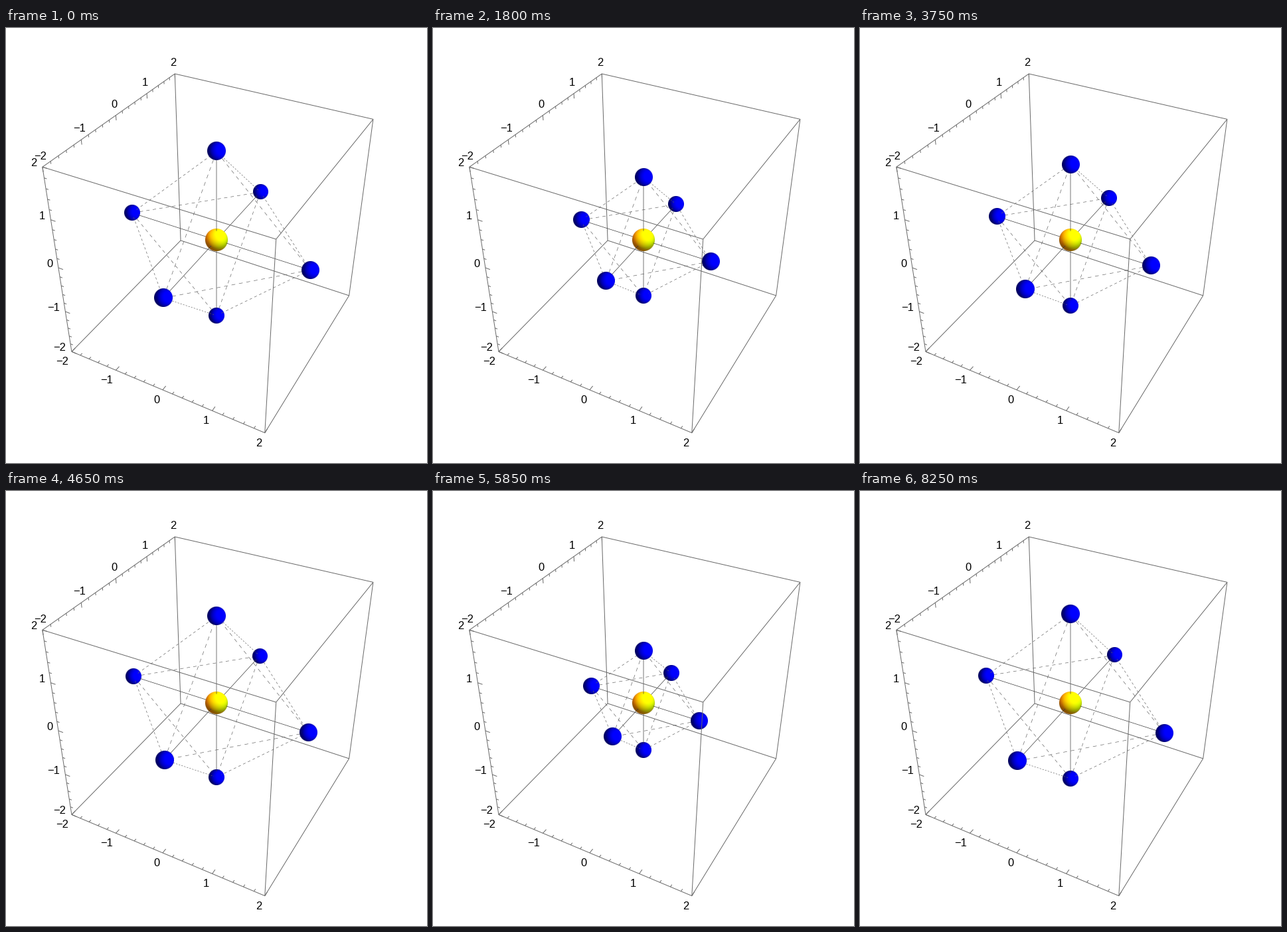
These frames come from a looping animation (634 px wide and 655 px high, 9000 ms). A matplotlib script:

```python
import itertools

import matplotlib.pyplot as plt
import numpy as np
from matplotlib.animation import FuncAnimation

W, H, DPI = 634, 655, 80
PX = 72 / DPI  # points per pixel

# Camera on the box centre; the box spans -2..2 on each axis.
EYE = 4 * np.array([1.3, -2.4, 2.0])
CENTRE = np.array([317.0, 319.2])
UNIT = 83.6  # pixels per unit at the box centre
DIST = np.linalg.norm(EYE)
AHEAD = EYE / DIST
RIGHT = np.cross((0, 0, 1), AHEAD)
RIGHT /= np.linalg.norm(RIGHT)
UP = np.cross(AHEAD, RIGHT)

BALL_R, CORE_R = 0.15, 0.2
DASH = 0.065
BOND_WIDTH, EDGE_WIDTH, BOX_WIDTH = 0.7, 0.65, 1.0
GREY = "#6a6a6a"

REST, PEAK, SWING = 1.82, 1.815, 0.404
HOLD, PERIOD, FRAMES = 5, 24.5, 60


def depth_scale(p):
    return 1 - AHEAD @ p / DIST


def project(p):
    return CENTRE + UNIT * np.array([RIGHT @ p, -UP @ p]) / depth_scale(p)


def layer(p):
    """Draw order: nearer points come later."""
    return 10 + AHEAD @ p


def sphere_image(base, n=96):
    """Shaded sphere under coloured lights."""
    t = (np.arange(n) + 0.5) / n * 2 - 1
    x, y = np.meshgrid(t, -t)
    rad = np.hypot(x, y)
    k = np.minimum(1, 0.99 / rad)
    nx, ny = x * k, y * k
    normal = np.stack([nx, ny, np.sqrt(1 - nx**2 - ny**2)], axis=-1)
    light = np.ones((n, n, 3)) * (0.4, 0.2, 0.2)
    lamps = [((2, 0, 2), (0, 0.18, 0.5)), ((2, 2, 3), (0.18, 0.5, 0.18)),
             ((0, 2, 2), (0.5, 0.18, 0)), ((0, 0, 2), (0, 0, 0.18))]
    for way, tint in lamps:
        way = np.array(way) / np.linalg.norm(way)
        light += np.clip(normal @ way, 0, 1)[..., None] * tint
    rgba = np.ones((n, n, 4))
    rgba[..., :3] = np.clip(1.1 * light**0.8 * base, 0, 1)
    rgba[..., 3] = np.clip((1 - rad) * n / 2 + 0.5, 0, 1)
    return rgba


plt.rcParams["path.snap"] = False
fig = plt.figure(figsize=(W / DPI, H / DPI), dpi=DPI, facecolor="white")
ax = fig.add_axes([0, 0, 1, 1])
ax.axis("off")
ax.set_xlim(0, W)
ax.set_ylim(H, 0)


def line(a, b, color, width, z):
    return ax.plot([a[0], b[0]], [a[1], b[1]], color=color, lw=width * PX,
                   zorder=z, solid_capstyle="butt", dash_capstyle="butt")[0]


def sphere(base, z):
    return ax.imshow(sphere_image(base), extent=(0, 1, 1, 0), aspect="auto",
                     interpolation="bilinear", zorder=z)


def place(ball, centre, radius):
    x, y = project(centre)
    r = radius * UNIT / depth_scale(centre)
    ball.set_extent((x - r, x + r, y + r, y - r))


def span(artist, a, b):
    """Lay a line between two points; return its length in pixels."""
    p, q = project(a), project(b)
    artist.set_data([p[0], q[0]], [p[1], q[1]])
    return np.linalg.norm(q - p)


def draw_box():
    corners = [np.array(c) for c in itertools.product((-2, 2), repeat=3)]
    nearest = max(corners, key=layer)
    for a, b in itertools.combinations(corners, 2):
        if np.count_nonzero(a - b) == 1:
            front = (a == nearest).all() or (b == nearest).all()
            line(project(a), project(b), GREY, BOX_WIDTH, 20 if front else 1)


def draw_axis(axis, start, inward, shift, ha):
    """Ticks and labels along the box edge that leaves the start corner."""
    for i in range(-10, 11):
        p = np.array(start, float)
        p[axis] = i / 5
        a = project(p)
        way = project(p + 0.1 * np.array(inward)) - a
        major = i % 5 == 0
        size = 7.5 if major else 4
        line(a, a + way / np.linalg.norm(way) * size, GREY, BOX_WIDTH, 2)
        if major:
            x, y = a + shift
            ax.text(x, y, str(i // 5).replace("-", "\u2212"), ha=ha,
                    va="center", family="Liberation Sans",
                    fontsize=16.5 * PX, color="black", zorder=30)


draw_box()
draw_axis(0, (-2, -2, -2), (0, 1, 0), (-4.9, 15.7), "right")
draw_axis(1, (-2, -2, 2), (0, 0, -1), (-2.9, -16.2), "center")
draw_axis(2, (-2, -2, -2), (1, 0, 0), (-8.5, -5.6), "right")

DIRS = [s * np.eye(3)[i] for i in range(3) for s in (-1, 1)]
PAIRS = [(a, b) for a, b in itertools.combinations(DIRS, 2) if a @ b == 0]
ORIGIN = np.zeros(2)

core = sphere((1, 1, 0), 10)
place(core, np.zeros(3), CORE_R)
balls = [sphere((0, 0, 1), layer(d)) for d in DIRS]
bonds = [line(ORIGIN, ORIGIN, "#404040", BOND_WIDTH, layer(d / 2))
         for d in DIRS]
edges = [line(ORIGIN, ORIGIN, "#606060", EDGE_WIDTH, layer((a + b) / 2))
         for a, b in PAIRS]


def bond_length(k):
    if k < HOLD or k >= FRAMES - HOLD:
        return REST
    phase = 2 * np.pi * (k - HOLD) / PERIOD
    return PEAK - SWING * (1 - np.cos(phase))


def update(k):
    r = bond_length(k)
    for d, ball, bond in zip(DIRS, balls, bonds):
        place(ball, r * d, BALL_R)
        span(bond, CORE_R * d, (r - BALL_R) * d)
    for (a, b), edge in zip(PAIRS, edges):
        trim = (b - a) / np.sqrt(2) * BALL_R
        start, end = r * a + trim, r * b - trim
        # Dashes have a fixed length in space, so they foreshorten.
        scale = span(edge, start, end) / np.linalg.norm(end - start)
        dash = DASH * scale / EDGE_WIDTH
        edge.set_linestyle((0, (dash, dash)))
    return balls + bonds + edges


update(0)
anim = FuncAnimation(fig, update, frames=FRAMES, interval=150,
                     repeat=True, repeat_delay=0, blit=False)
plt.show()
```
